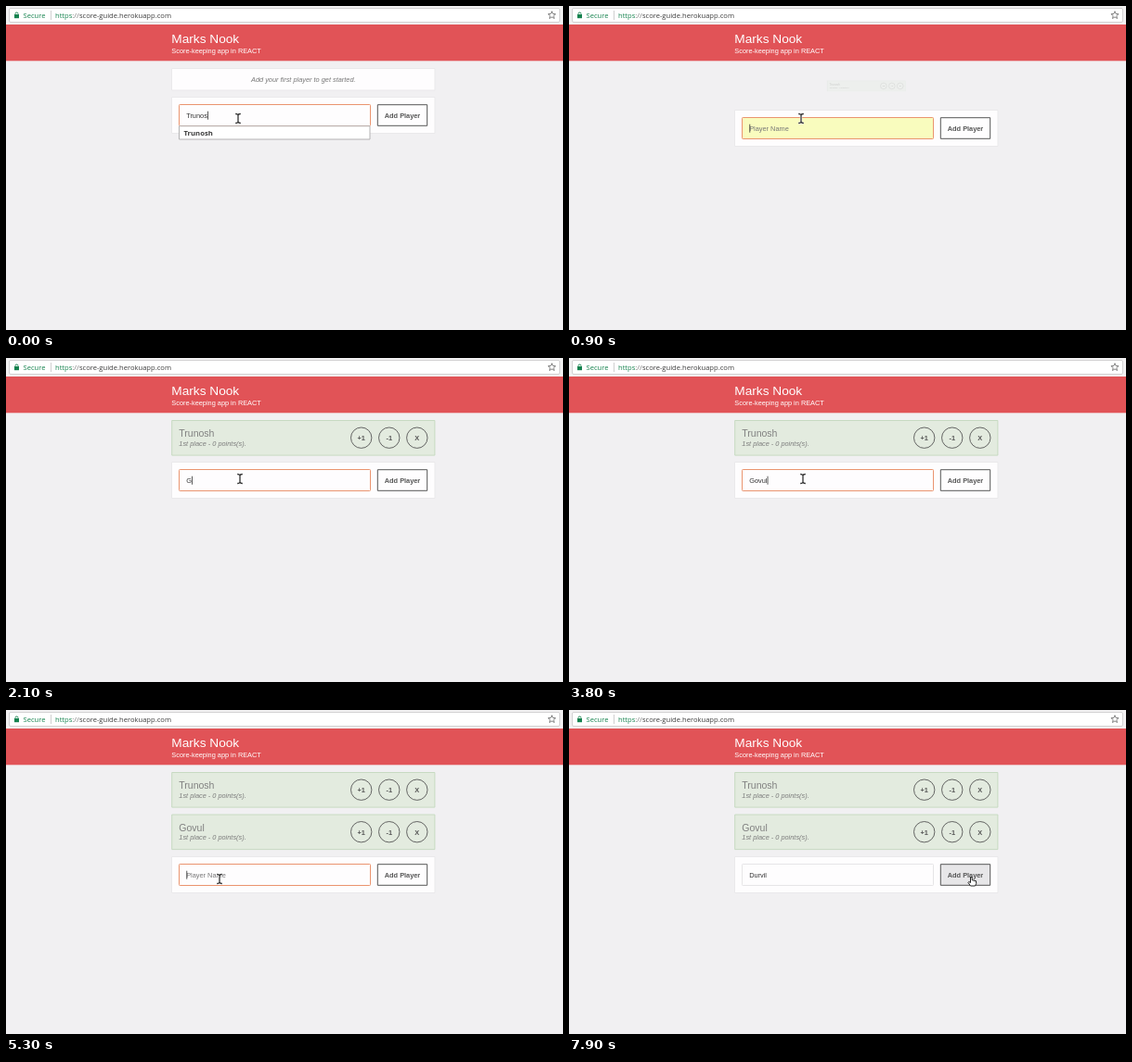
An HTML page with a canvas for the animation above (8 s loop, 600 by 350 pixels).

```html
<!DOCTYPE html>
<html lang="en">
<head>
<meta charset="utf-8">
<title>Marks Nook</title>
<style>
  html, body { margin: 0; width: 100%; height: 100%; overflow: hidden; background: #f1f0f2; }
  canvas { display: block; }
</style>
</head>
<body>
<canvas id="stage" width="600" height="350"></canvas>
<script>
const ctx = document.getElementById('stage').getContext('2d');
const LOOP = 8000, STEP = 100;
const SANS = '"Liberation Sans", Arial, sans-serif';
const UI = '"Open Sans", "Noto Sans", sans-serif';
const BODY = 7.36;
const PLAYERS = [
  { name: 'Trunosh', enters: 765, top: 67.5 },
  { name: 'Govul', enters: 4565, top: 113 },
];
const THIRD = 'Durvil';

// [time, value] of the input field after each key press or submit
const typed = (name, times, from = 1) => times.map((t, i) => [t, name.slice(0, from + i)]);
const KEYS = [
  ...typed(PLAYERS[0].name, [0, 300], 6), [765, ''],
  ...typed(PLAYERS[1].name, [2100, 2300, 2550, 3500, 3700]), [4565, ''],
  [5300, ''], ...typed(THIRD, [5700, 5900, 6100, 6300, 6400, 6700]),
];

// [time, x, y] of the pointer hotspot
const PATH = [
  [0, 250, 121.5], [1400, 250, 121.5], [1700, 252, 130.5], [4000, 252, 130.5],
  [4400, 432, 131], [4600, 432, 131], [4800, 269.5, 138], [5300, 230, 182.5],
  [6900, 230, 182.5], [7600, 443, 194], [7700, 443, 194], [7900, 433.5, 180.5], [8000, 433.5, 180.5],
];

const easeInOut = p => p < .5 ? 2 * p * p : 1 - 2 * (1 - p) ** 2;
const clamp = p => Math.min(1, Math.max(0, p));
const within = (t, a, b) => t >= a && t < b;

function text(str, x, y, { size = BODY, color = '#555', style = '', family = SANS, align = 'left' } = {}) {
  ctx.font = `${style} ${size}px ${family}`;
  ctx.fillStyle = color;
  ctx.textAlign = align;
  ctx.fillText(str, x, y);
  return ctx.measureText(str).width;
}

function box(x, y, w, h, fill, stroke, radius = 0, line = 1) {
  ctx.beginPath();
  ctx.roundRect(x, y, w, h, radius);
  if (fill) { ctx.fillStyle = fill; ctx.fill(); }
  if (stroke) { ctx.strokeStyle = stroke; ctx.lineWidth = line; ctx.stroke(); }
}

function polygon(points, fill, stroke, line) {
  ctx.beginPath();
  points.forEach(([x, y]) => ctx.lineTo(x, y));
  ctx.closePath();
  if (fill) { ctx.fillStyle = fill; ctx.fill(); }
  ctx.strokeStyle = stroke;
  ctx.lineWidth = line;
  ctx.stroke();
}

function addressBar() {
  ctx.fillStyle = '#f2f1f2';
  ctx.fillRect(0, 0, 600, 20);
  box(3.5, 2.5, 593, 15, '#fff', '#d2d1d2', 1.5);
  ctx.fillStyle = '#16834f';
  ctx.fillRect(9, 9, 5, 4.2);
  ctx.beginPath();
  ctx.arc(11.5, 8.6, 1.6, Math.PI, 0);
  ctx.strokeStyle = '#16834f';
  ctx.lineWidth = 1;
  ctx.stroke();
  const bar = { size: 7.6, family: UI };
  text('Secure', 18.5, 12.6, { ...bar, color: '#16834f' });
  ctx.fillStyle = '#d0d0d0';
  ctx.fillRect(48, 5, 1, 10);
  let x = 53;
  for (const [part, color] of [['https', '#16834f'], ['://', '#777'], ['score-guide.herokuapp.com', '#3c3c3c']])
    x += text(part, x, 12.6, { ...bar, color });
  const star = Array.from({ length: 10 }, (_, i) => {
    const a = i * Math.PI / 5 - Math.PI / 2, r = i % 2 ? 1.9 : 4.3;
    return [588 + r * Math.cos(a), 10 + r * Math.sin(a)];
  });
  polygon(star, null, '#666', .8);
}

function header() {
  ctx.fillStyle = '#e15357';
  ctx.fillRect(0, 20, 600, 39.3);
  text('Marks Nook', 178.3, 40.4, { size: 13.67, color: '#fff' });
  text('Score-keeping app in REACT', 178.3, 50.5, { color: '#fff' });
}

function playerCard({ name, enters, top }, t) {
  const p = easeInOut(clamp((t - enters) / 350));
  if (p <= 0) return;
  const cy = top + 19;
  ctx.save();
  ctx.globalAlpha = p;
  ctx.translate(320.3, cy);
  ctx.scale(p, p);
  ctx.translate(-320.3, -cy);
  box(178.7, top, 283.2, 37.6, '#e3ebdf', '#c3d8be', 0, .9);
  text(name, 186.3, top + 17.7, { size: 10.5, color: '#808080' });
  text('1st place - 0 points(s).', 186.3, top + 27.1, { style: 'italic', color: '#7c7c7c' });
  ['+1', '-1', 'X'].forEach((label, i) => {
    const x = 382.7 + 30.05 * i;
    ctx.beginPath();
    ctx.arc(x, cy - .3, 11.2, 0, 7);
    ctx.strokeStyle = '#555';
    ctx.lineWidth = .9;
    ctx.stroke();
    text(label, x, cy + 2.5, { style: 'bold', align: 'center' });
  });
  ctx.restore();
}

function squiggle(x, y, width) {
  ctx.beginPath();
  for (let i = 0; i <= width; i++) ctx.lineTo(x + i, y + (i % 2 ? .5 : -.5));
  ctx.strokeStyle = '#e0584c';
  ctx.lineWidth = .7;
  ctx.stroke();
}

function form(top, t) {
  const [keyTime, value] = KEYS.filter(k => k[0] <= t).pop();
  const focused = !within(t, 4600, 5300) && t < 7400;
  const autofilled = within(t, 300, 2100);
  const base = top + 22.2;
  box(178.5, top, 283.5, 39, '#fefdfe', '#eae9eb');
  box(186.5, top + 8, 206, 23, autofilled ? '#f9fcbe' : '#fefdfe', focused ? '#ea946f' : '#e6e5e7', .8);
  if (value) text(value, 194.2, base, { color: '#333' });
  else text('Player Name', 194.2, base, { color: '#777' });
  const width = ctx.measureText(value).width;
  if (within(t, 300, 765)) squiggle(194, base + 1.6, width);
  if (focused && (t - keyTime) % 1000 < 500) {
    ctx.fillStyle = '#333';
    ctx.fillRect(194.4 + width, base - 7, .8, 9);
  }
  const pressed = within(t, 4300, 5300) || t >= 7800;
  box(400.3, top + 8.2, 53.4, 22.6, pressed ? '#e7e6e8' : '#fefdfe', '#555', 0, 1);
  text('Add Player', 427, base, { style: 'bold', align: 'center' });
}

function suggestion(t) {
  if (t >= 700) return;
  const label = (x, color) => text(PLAYERS[0].name, x, 139.7, { size: 7.7, style: 'bold', family: UI, color });
  if (t < 300) {
    box(186.5, 129.7, 205.5, 14.3, '#fff', '#b3b2b3');
    label(191.5, '#3a3a3a');
  } else {
    const fading = t >= 600;
    box(187.5, 130.5, 203.5, 13.3, fading ? '#f4bda8' : '#f2a487', '#d8b9ac', 0, .8);
    label(192.3, fading ? '#7b6d67' : '#4a4440');
  }
}

function pointerAt(t) {
  const i = PATH.findIndex(k => k[0] > t);
  const [t0, x0, y0] = PATH[i - 1], [t1, x1, y1] = PATH[i];
  const p = (t - t0) / (t1 - t0);
  return [x0 + (x1 - x0) * p, y0 + (y1 - y0) * p];
}

function beam() {
  for (const [color, line] of [['#fff', 2.4], ['#333', 1.3]]) {
    ctx.beginPath();
    for (const s of [-1, 1]) {
      ctx.moveTo(-2.8, 5 * s);
      ctx.quadraticCurveTo(0, 5 * s, 0, 3.2 * s);
      ctx.quadraticCurveTo(0, 5 * s, 2.8, 5 * s);
    }
    ctx.moveTo(0, -4);
    ctx.lineTo(0, 4);
    ctx.strokeStyle = color;
    ctx.lineWidth = line;
    ctx.stroke();
  }
}

const arrow = () => polygon(
  [[0, 0], [0, 10], [2.3, 8], [3.8, 11.4], [5.4, 10.7], [3.9, 7.4], [7, 7.2]], '#fff', '#222', 1);

const hand = () => polygon(
  [[-1, 0], [.6, 0], [.8, 3.3], [5, 4.2], [5.2, 7], [4, 9.5], [-1, 9.5], [-3.6, 5.8], [-2.8, 5], [-1, 6]],
  '#fff', '#222', 1);

function pointer(t, formTop) {
  const [x, y] = pointerAt(t);
  const inRow = within(y, formTop + 8, formTop + 31);
  const draw = inRow && within(x, 186, 393) ? beam : inRow && within(x, 400, 454) ? hand : arrow;
  ctx.save();
  ctx.translate(x, y);
  draw();
  ctx.restore();
}

function render(t) {
  ctx.fillStyle = '#f1f0f2';
  ctx.fillRect(0, 0, 600, 350);
  addressBar();
  header();
  const count = PLAYERS.filter(p => p.enters <= t).length;
  const formTop = [98.5, 112.5, 158.5][count];
  if (!count) {
    box(178.5, 67.5, 283.5, 23.5, '#fefdfe', '#eae9eb');
    text('Add your first player to get started.', 320.3, 81.6, { style: 'italic', color: '#777', align: 'center' });
  }
  PLAYERS.forEach(p => playerCard(p, t));
  form(formTop, t);
  suggestion(t);
  pointer(t, formTop);
}

const start = performance.now();
function tick() {
  const t = (performance.now() - start) % LOOP;
  render(Math.floor(t / STEP) * STEP);
  requestAnimationFrame(tick);
}
tick();
</script>
</body>
</html>
```
